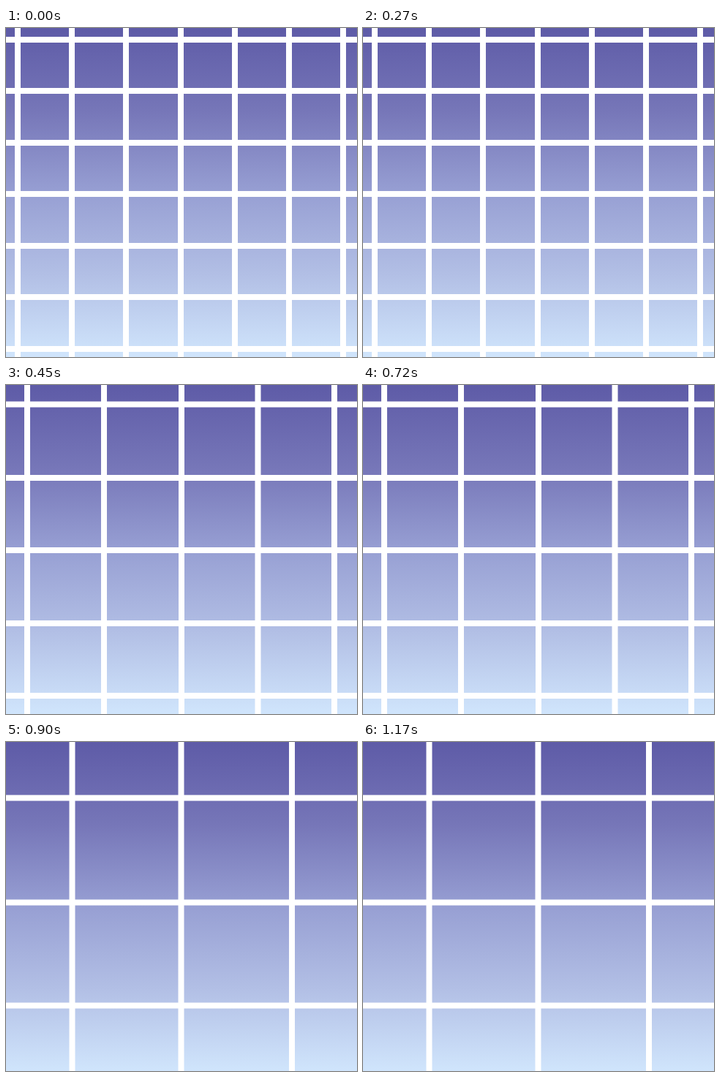
These frames come from a looping animation (480 px wide and 450 px high, 1.35 s). An HTML page with a canvas:

```html
<!DOCTYPE html>
<html lang="en">
<head>
<meta charset="utf-8">
<title>Widening grid</title>
<style>
  html, body { margin: 0; width: 100%; height: 100%; overflow: hidden; }
  canvas { display: block; width: 480px; height: 450px; }
</style>
</head>
<body>
<canvas id="stage" width="480" height="450"></canvas>
<script>
const ctx = document.getElementById('stage').getContext('2d');
const WIDTH = 480, HEIGHT = 450, BAR = 8, HOLD = 450;

// Left edges of the vertical bars and top edges of the horizontal ones
const grids = [
  { x: [12, 86, 160, 235, 309, 383, 457], y: [12, 82, 153, 223, 294, 364, 435] },
  { x: [25, 130, 236, 340.5, 445], y: [22.5, 123, 222, 322, 421] },
  { x: [86.5, 235.5, 387], y: [72.5, 215.5, 356.5] }
];

const sky = ctx.createLinearGradient(0, 0, 0, HEIGHT);
['#5e5ba7', '#7676b8', '#979fd3', '#b2bfe5', '#d0e5fc']
  .forEach((color, i, all) => sky.addColorStop(i / (all.length - 1), color));

function draw({ x, y }) {
  ctx.fillStyle = sky;
  ctx.fillRect(0, 0, WIDTH, HEIGHT);
  ctx.fillStyle = '#fff';
  x.forEach(left => ctx.fillRect(left, 0, BAR, HEIGHT));
  y.forEach(top => ctx.fillRect(0, top, WIDTH, BAR));
}

let start = null, shown = 0;
function tick(now) {
  start ??= now;
  const step = Math.floor((now - start) / HOLD) % grids.length;
  if (step !== shown) draw(grids[shown = step]);
  requestAnimationFrame(tick);
}

draw(grids[0]);
requestAnimationFrame(tick);
</script>
</body>
</html>
```
